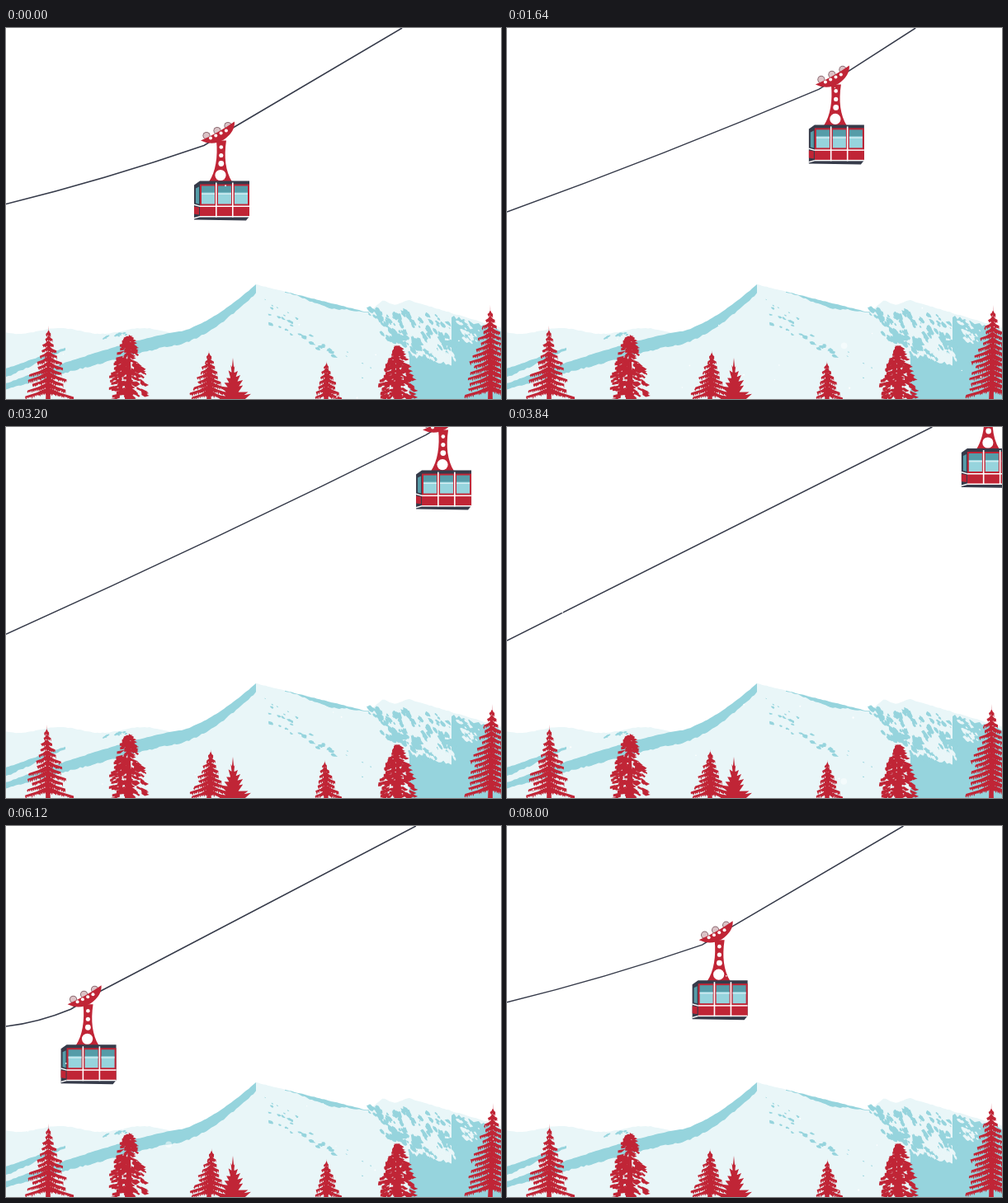
These frames come from a looping animation (600 px wide and 450 px high, 8.04 s). An HTML page with a canvas:

```html
<!DOCTYPE html>
<html>
<head>
<meta charset="utf-8">
<style>
html, body { margin: 0; height: 100%; overflow: hidden; background: #fff; }
canvas { display: block; }
</style>
</head>
<body>
<canvas id="stage" width="600" height="450"></canvas>
<script>
const ctx = document.getElementById('stage').getContext('2d');
const LOOP = 8040, TAU = Math.PI * 2;
const RED = '#c02536', DARK = '#363b4a', PALE = '#e9f6f8', BLUE = '#96d4dd', TEAL = '#559ca8', WHITE = '#fff';

let seed = 11;
const rnd = (a = 0, b = 1) => {
  seed = (seed * 16807) % 2147483647;
  return a + (b - a) * seed / 2147483647;
};
const mix = (a, b, f) => a + (b - a) * f;

// ---- Mountains ----

// Filled strip between two functions of x, with ragged edges
function strip(x0, x1, top, bottom, ragged) {
  const path = new Path2D(), n = Math.ceil((x1 - x0) / 3);
  for (let i = 0; i <= n; i++) {
    const x = mix(x0, x1, i / n);
    path.lineTo(x, top(x) + rnd(-0.4, 0.4));
  }
  for (let i = n; i >= 0; i--) {
    const x = mix(x0, x1, i / n);
    path.lineTo(x, bottom(x) + rnd(-ragged, ragged));
  }
  return path;
}

// Ragged, slanted flecks scattered along a line
function flecks(count, x0, y0, x1, y1, spread, size, tilt) {
  const path = new Path2D(), c = Math.cos(tilt), s = Math.sin(tilt);
  for (let i = 0; i < count; i++) {
    const f = rnd(), x = mix(x0, x1, f) + rnd(-spread, spread), y = mix(y0, y1, f) + rnd(-spread, spread);
    const l = rnd(1, size), w = l * 0.45;
    for (let k = 0; k < 10; k++) {
      const a = TAU * k / 10, r = rnd(0.6, 1.2), u = l * r * Math.cos(a), v = w * r * Math.sin(a);
      path[k ? 'lineTo' : 'moveTo'](x + u * c - v * s, y + u * s + v * c);
    }
    path.closePath();
  }
  return path;
}

const slope = (x, px, py, left, right) => py + (x < px ? (px - x) * left : (x - px) * right);
const mainPeak = x => x < 303
  ? 369 - 58 * Math.max(0, (x - 205) / 98) ** 1.5
  : 311 + (x - 303) * 0.25;
const skyline = x => Math.min(
  x < 205 ? 367.5 - 3.5 * Math.cos((x - 65) / 16) : mainPeak(x),
  slope(x, 457, 330, 0.85, 0.45),
  slope(x, 488, 330, 0.35, 0.3)
);
const spur = x => x < 205 ? 369 + 62 * (1 - x / 205) ** 1.2 : skyline(x);
const floor = () => 452;

const land = [
  [PALE, strip(0, 600, skyline, floor, 0)],
  [BLUE, strip(0, 303, spur, x => spur(x) + 7 + 9 * Math.sin(Math.min(1, x / 303) * 2.7), 1)],
  [BLUE, strip(0, 72, x => 413 - x * 0.35, x => 424 - x * 0.47, 1)],
  [BLUE, flecks(9, 118, 376, 155, 370, 2, 5, -0.3)],
  [BLUE, strip(338, 440, skyline, x => skyline(x) + 6 * Math.sin((x - 338) / 33) ** 2, 1)],
  [BLUE, strip(489, 548, x => 396 + (x - 489) * 0.25 + rnd(-3, 3), floor, 0)],
  [BLUE, strip(540, 600, x => skyline(x) + 4 + rnd(-2, 2), floor, 0)],
  [BLUE, flecks(20, 325, 352, 398, 396, 8, 5, 0.4)],
  [BLUE, flecks(10, 312, 328, 350, 358, 8, 3, 0.6)],
  [BLUE, flecks(26, 440, 344, 466, 356, 6, 6, 0.8)],
  [BLUE, flecks(55, 458, 358, 512, 398, 10, 8, 0.9)],
  [BLUE, flecks(45, 478, 346, 545, 392, 10, 7, 1)],
  [BLUE, flecks(12, 505, 350, 545, 362, 6, 5, 0.8)],
  [PALE, flecks(24, 545, 358, 572, 380, 9, 5, 0.8)],
  [PALE, flecks(18, 500, 394, 544, 402, 5, 5, 1)],
  [BLUE, flecks(5, 400, 390, 440, 420, 10, 1.5, 0.5)]
];

// ---- Trees, built around the foot of the trunk at (0, 0) ----

function trunk(h, w) {
  const path = new Path2D();
  path.moveTo(0, -h);
  path.lineTo(w, 4);
  path.lineTo(-w, 4);
  path.closePath();
  return path;
}

// Each row is one drooping pair of branches with a toothed lower edge
function fir(h, w, rows) {
  const path = trunk(h, 3);
  for (let i = 1; i <= rows; i++) {
    const f = i / rows, y = -h + h * (0.05 + f * 0.86);
    const right = w * f ** 0.9 * rnd(0.65, 1.08), left = w * f ** 0.9 * rnd(0.65, 1.08);
    const sag = x => y + Math.abs(x) * 0.24;
    path.moveTo(0, y - 6);
    path.lineTo(right * 0.5, sag(right * 0.5) - 3);
    path.lineTo(right, sag(right) - 2);
    for (let x = right; x > -left; x -= 2.4) {
      path.lineTo(x, sag(x) + rnd(1, 3.5));
      path.lineTo(x - 1.2, sag(x) + rnd(-0.8, 1));
    }
    path.lineTo(-left, sag(left) - 2);
    path.lineTo(-left * 0.5, sag(left * 0.5) - 3);
    path.closePath();
  }
  return path;
}

function bushy(h, w) {
  const path = trunk(h, 5);
  for (let i = 0; i < 230; i++) {
    const f = rnd(0.02, 0.98), half = w * Math.min(1, 0.15 + f * 1.3);
    const x = rnd(-half, half), y = -h + h * f + Math.abs(x) * 0.12;
    const l = rnd(2, 5), dip = Math.sign(x) * 1.5;
    path.moveTo(x - l, y - dip - 1.5);
    path.lineTo(x + l, y + dip - 0.5);
    path.lineTo(x + rnd(-1, 2), y + 2.5);
    path.lineTo(x - l, y - dip + 1.5);
    path.closePath();
  }
  return path;
}

function sapling(h, w) {
  const path = trunk(h, 5);
  for (let i = 1; i <= 7; i++) {
    for (const side of [-1, 1]) {
      const f = i / 7, y = -h + h * (0.25 + f * 0.8), reach = side * w * f * rnd(0.75, 1.1);
      const points = [[0, y + 3], [0, y - 5], [reach, y - 5 - rnd(0, 5)], [reach * 0.4, y + 3]];
      if (side < 0) points.reverse();
      points.forEach(([px, py], k) => path[k ? 'lineTo' : 'moveTo'](px, py));
      path.closePath();
    }
  }
  return path;
}

const still = () => 0;
const slow = p => 1.6 - 2 * Math.cos(TAU * (p * 2 - 0.1));
const quick = p => 1.3 * Math.cos(TAU * p * 4) - 0.6;
const trees = [
  [51, 89, 31, quick, fir, 12],
  [149, 77, 22, still, bushy],
  [246, 59, 24, slow, fir, 9],
  [275, 50, 20, still, sapling],
  [388, 46, 18, quick, fir, 7],
  [475, 65, 20, still, bushy],
  [587, 114, 38, slow, fir, 15]
].map(([x, h, w, lean, grow, rows]) => ({ x, h, lean, path: grow(h, w, rows) }));

const snow = Array.from({ length: 46 }, (_, i) => ({
  x: rnd(0, 600), y: rnd(0, 470), laps: Math.floor(rnd(2, 5)),
  drift: rnd(3, 12), r: i < 2 ? rnd(3.5, 5) : rnd(0.6, 1.2), alpha: i < 2 ? 0.5 : 0.9
}));

// ---- Drawing ----

function shape(color, ...points) {
  ctx.fillStyle = color;
  ctx.beginPath();
  for (const [x, y] of points) ctx.lineTo(x, y);
  ctx.fill();
}
function rect(color, x, y, w, h) {
  ctx.fillStyle = color;
  ctx.fillRect(x, y, w, h);
}
function dot(color, x, y, r) {
  ctx.fillStyle = color;
  ctx.beginPath();
  ctx.arc(x, y, r, 0, TAU);
  ctx.fill();
}

// Bell curve on the cyclic loop position
const bell = (p, centre, width) => {
  const d = p - centre - Math.round(p - centre);
  return Math.exp(-((d / width) ** 2));
};

function drawCable(p, x, y) {
  const left = 237 - 24.7 * Math.cos(TAU * (p - 0.05));
  const right = 497 - 18 * bell(p, 0.03, 0.12) + 29 * bell(p, 0.41, 0.1);
  const gx = x - 20, gy = y - 36;
  ctx.strokeStyle = DARK;
  ctx.lineWidth = 1.5;
  ctx.beginPath();
  ctx.moveTo(0, left);
  if (gx > 0 && gy > 0) {
    ctx.quadraticCurveTo(gx / 2, (left + gy) / 2 + 6, gx, gy);
    ctx.lineTo(x + 16, y - 58);
  }
  if (gy < 0 || y > 58) ctx.lineTo(right, 0);
  ctx.stroke();
}

// Origin is the centre of the large hole in the hanger
function drawCabin(x, y) {
  ctx.save();
  ctx.translate(x, y);
  for (let i = 0; i < 3; i++) {
    dot('#8d6b72', -17 + i * 13, -48 - i * 6, 4.6);
    dot('#dcc3c7', -17 + i * 13, -48 - i * 6, 3.6);
  }
  ctx.fillStyle = RED;
  ctx.beginPath();
  ctx.moveTo(-5, -42);
  ctx.lineTo(7, -42);
  ctx.bezierCurveTo(4, -22, 6, -5, 14, 8);
  ctx.lineTo(-14, 8);
  ctx.bezierCurveTo(-6, -4, -3, -22, -5, -42);
  ctx.fill();
  ctx.beginPath();
  ctx.moveTo(-24, -42);
  ctx.quadraticCurveTo(-3, -51, 17, -65);
  ctx.quadraticCurveTo(18, -53, 4, -43);
  ctx.quadraticCurveTo(-10, -35, -24, -42);
  ctx.fill();
  for (let i = 0; i < 4; i++) dot(WHITE, -12 + i * 6.3, -45 - i * 3, 2);
  for (let i = 0; i < 3; i++) dot(WHITE, 0.8, -34 + i * 10, 2.3 + i * i * 0.27);
  dot(WHITE, 0, 0, 6.6);

  shape(DARK, [-32, 12], [-25, 7], [35, 7], [35, 50], [31, 55], [-32, 54]);
  rect(RED, -25, 11, 60, 39);
  shape(TEAL, [-30, 16], [-26, 14], [-26, 35], [-30, 34]);
  shape(RED, [-32, 38], [-26, 39], [-26, 48], [-32, 47]);
  for (let wx = -23; wx < 35; wx += 20) {
    rect(TEAL, wx, 13, 16, 10);
    rect(BLUE, wx, 21, 16, 14);
    rect('#d5eef2', wx, 22, 16, 1.4);
    if (wx > 0 || wx > -20) rect(WHITE, wx - 3, 9, 1.6, 42);
  }
  for (const [wy, tilt] of [[37, -2], [49.5, 2]]) {
    rect(WHITE, -25, wy, 60, 1.5);
    shape(WHITE, [-32, wy + tilt], [-25, wy], [-25, wy + 1.5], [-32, wy + tilt + 1.5]);
  }
  ctx.restore();
}

function draw(p) {
  const x = 260 + 676 * (p > 0.555 ? p - 1 : p), y = 178.5 - 0.494 * (x - 260);
  rect(WHITE, 0, 0, 600, 450);
  for (const [color, path] of land) {
    ctx.fillStyle = color;
    ctx.fill(path);
  }
  drawCable(p, x, y);
  drawCabin(x, y);
  ctx.fillStyle = RED;
  for (const tree of trees) {
    ctx.save();
    ctx.transform(1, 0, -tree.lean(p) / tree.h, 1, tree.x, 450);
    ctx.fill(tree.path);
    ctx.restore();
  }
  for (const s of snow) {
    ctx.globalAlpha = s.alpha;
    dot(WHITE, s.x + s.drift * Math.sin(TAU * (p * s.laps + s.y)), (s.y + 470 * s.laps * p) % 470 - 10, s.r);
  }
  ctx.globalAlpha = 1;
}

const start = performance.now();
function frame() {
  const t = (performance.now() - start) % LOOP;
  draw(Math.floor(t / 40) * 40 / LOOP);
  requestAnimationFrame(frame);
}
frame();
</script>
</body>
</html>
```
